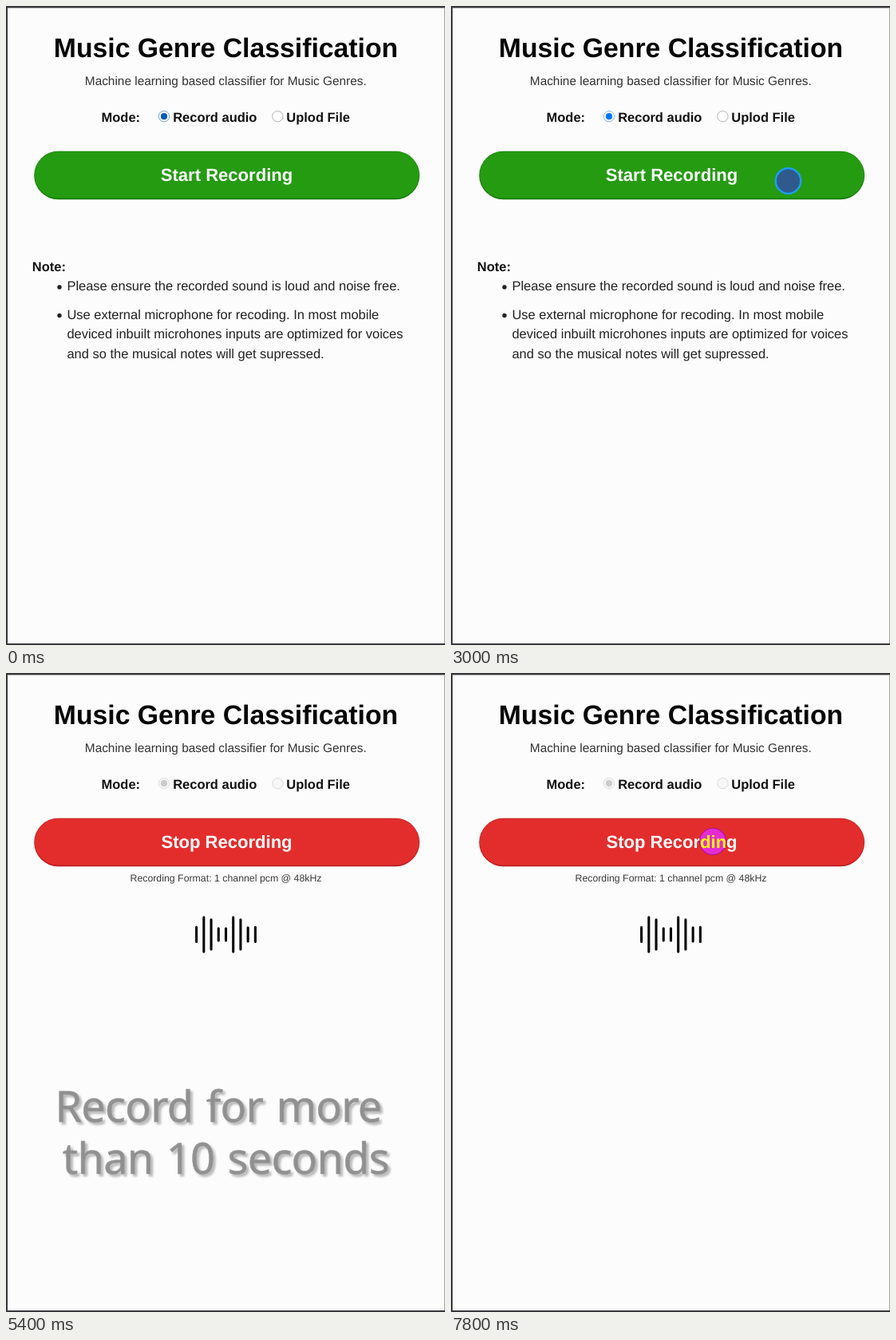
Write an HTML page that moves like this. It is 550x800 px and loops after 8000 ms.

```html
<!DOCTYPE html>
<html lang="en">
<head>
<meta charset="utf-8">
<title>Music Genre Classification</title>
<style>
  html, body { margin: 0; width: 100%; height: 100%; overflow: hidden; background: #fcfcfc; }
  svg {
    display: block; width: 550px; height: 800px; fill: #222;
    font: 16.48px "Liberation Sans", Arial, sans-serif; text-rendering: geometricPrecision;
  }
  .bold { font-weight: bold; fill: #111; }
  .mid { text-anchor: middle; }
  .title { font-size: 33.75px; fill: #050505; }
  .lead { font-size: 15.38px; fill: #333; }
  .label { font-size: 22.05px; fill: #fff; }
  .format { font-size: 12.33px; fill: #3a3a3a; }
  .caption {
    font: 58.3px "Noto Sans", "DejaVu Sans", sans-serif; letter-spacing: -.7px; word-spacing: 6px;
    text-anchor: middle; fill: #959595; stroke: #959595; stroke-width: .5; text-shadow: 3px 3px 3px #0004;
  }
  .small { font-size: 54px; word-spacing: 3px; }
  .radio { fill: #fff; stroke: #b4b4b4; }
  .radio.on { stroke: var(--ring); }
  .dot { fill: var(--accent); }
  #stage { --accent: #005cb8; --ring: #6fa0cf; }
  #stage.pressed { --accent: #0075ff; --ring: #7fb4f0; }
  #stage.recording { --accent: #cbcbcb; --ring: #dadada; }
  .recording .radio { fill: #f7f7f7; stroke: #dadada; }
  .face { fill: #259b12; }
  .edge { fill: #177d08; }
  .recording .face { fill: #e32d2d; }
  .recording .edge { fill: #bd2023; }
  #wave { stroke: #050505; stroke-width: 3.1; stroke-linecap: round; }
  #cursor { mix-blend-mode: difference; fill: #00f; stroke: rgb(62, 72, 192); stroke-width: 1; r: 16.7px; }
  #cursor.click { fill: rgb(85, 65, 160); stroke: #00f; stroke-width: 2.5; r: 15.7px; }
  .recording #cursor.click { stroke: rgb(63, 210, 220); }
  .hidden { display: none; }
</style>
</head>
<body>
<svg id="stage" viewBox="0 0 550 800">
  <rect width="550" height="800" fill="#38363a"/>
  <rect x="2" y="2" width="548" height="796" fill="#a4a4a4"/>
  <rect x="2" y="3" width="547" height="795" fill="#fcfcfc"/>

  <text class="bold mid title" x="275.5" y="64">Music Genre Classification</text>
  <text class="mid lead" x="275.3" y="99">Machine learning based classifier for Music Genres.</text>

  <g class="bold">
    <text x="119.6" y="145">Mode:</text>
    <text x="209.2" y="145">Record audio</text>
    <text x="351.3" y="145">Uplod File</text>
    <text x="32.8" y="332">Note:</text>
  </g>
  <circle class="radio on" cx="198" cy="138.2" r="6.7"/>
  <circle class="dot" cx="198" cy="138.2" r="4.1"/>
  <circle class="radio" cx="340.4" cy="138.2" r="6.7"/>

  <rect class="edge" x="35.2" y="181.8" width="483" height="60.4" rx="30.2"/>
  <rect class="face" x="36" y="182.5" width="481.4" height="58" rx="29"/>
  <text id="action" class="bold mid label" x="276.5" y="219.3"></text>

  <g id="notes">
    <circle cx="67" cy="352" r="2.7"/>
    <text x="76.4" y="356.3">Please ensure the recorded sound is loud and noise free.</text>
    <circle cx="67" cy="387.5" r="2.7"/>
    <text x="76.4" y="392">Use external microphone for recoding. In most mobile</text>
    <text x="76.4" y="416.4">deviced inbuilt microhones inputs are optimized for voices</text>
    <text x="76.4" y="440.8">and so the musical notes will get supressed.</text>
  </g>
  <rect id="cover" x="30" y="310" width="60" height="30" fill="#fcfcfc"/>

  <g id="live">
    <text class="mid format" x="275.5" y="261">Recording Format: 1 channel pcm @ 48kHz</text>
    <path id="wave"/>
  </g>

  <text class="caption" data-from="1000" data-to="3000" x="278.3" y="634.5">Start Recording</text>
  <g class="caption small" data-from="3400" data-to="5600">
    <text x="266" y="561.5">Record for more</text>
    <text x="275.3" y="626.5">than 10 seconds</text>
  </g>
  <text class="caption" data-from="6600" data-to="7800" x="281.3" y="612.5">Stop recording</text>

  <circle id="cursor"/>
</svg>
<script>
  const LOOP = 8000, STEP = 200;
  const $ = id => document.getElementById(id);
  const captions = document.querySelectorAll('[data-from]');

  // bar heights of the three wave poses, shown in turn
  const poses = [
    [21, 46, 40, 18, 18, 46, 40, 20, 21],
    [37, 16, 25, 50, 37, 16, 23, 50, 39],
    [27, 12, 30, 58, 27, 12, 27, 58, 30]
  ];

  // time, x, y; a lone time hides the cursor
  const moves = [
    [0], [2000, 526, 132], [2200, 474, 180], [2400, 427, 218], [2600, 422.5, 219], [3600],
    [6600, 533, 316], [6800, 444, 207], [7000, 428, 196], [7200, 398, 200],
    [7400, 362, 206], [7600, 338, 210], [7800, 328, 211]
  ];

  const within = (t, from, to) => t >= from && t < to;
  const show = (el, on) => el.classList.toggle('hidden', !on);

  function drawWave(t) {
    const heights = poses[t / STEP % 3];
    $('wave').setAttribute('d', heights.map((h, i) =>
      `M${238.6 + 9.22 * i} ${327.3 - h / 2 + 1.4}v${h - 2.8}`).join(''));
  }

  function drawCursor(t) {
    const [, x, y] = moves.findLast(m => m[0] <= t);
    show($('cursor'), x !== undefined);
    if (x !== undefined) $('cursor').setAttribute('transform', `translate(${x} ${y})`);
    $('cursor').classList.toggle('click', within(t, 3000, 3600));
  }

  function draw(t) {
    const recording = t >= 3200;
    $('stage').classList.toggle('pressed', within(t, 3000, 3200));
    $('stage').classList.toggle('recording', recording);
    $('action').textContent = recording ? 'Stop Recording' : 'Start Recording';
    show($('notes'), !recording);
    show($('cover'), recording);
    show($('live'), recording);
    captions.forEach(c => show(c, within(t, +c.dataset.from, +c.dataset.to)));
    drawWave(t);
    drawCursor(t);
  }

  const start = performance.now();
  function tick() {
    const t = (performance.now() - start) % LOOP;
    draw(Math.floor(t / STEP) * STEP);
    requestAnimationFrame(tick);
  }
  tick();
</script>
</body>
</html>
```
